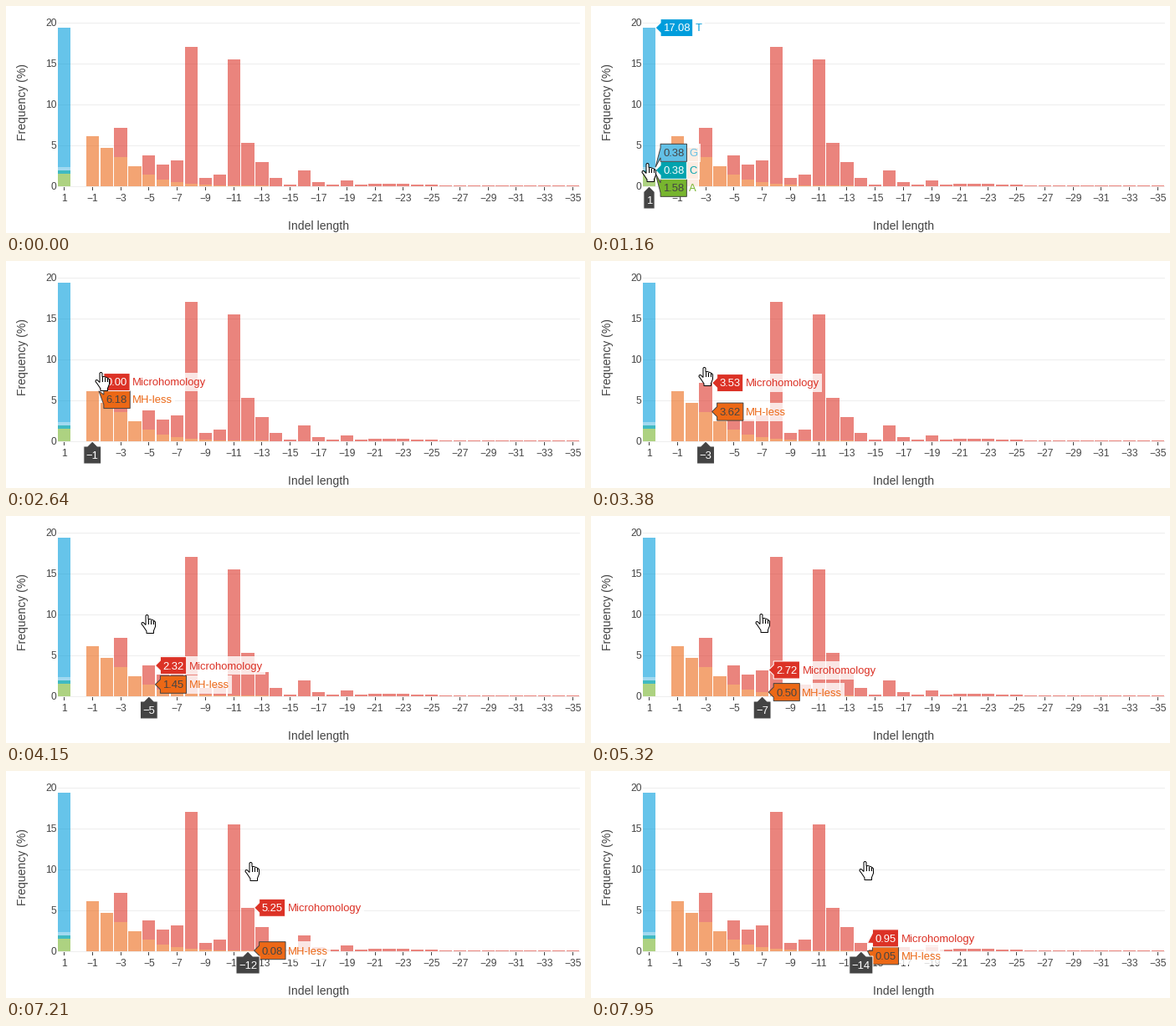
Recreate the animation shown at these times as a matplotlib script. Size 692 px wide and 272 px high, loop 8000 ms.

```python
import numpy as np
import matplotlib.pyplot as plt
from matplotlib.animation import FuncAnimation
from matplotlib.patches import Polygon, Rectangle

W, H, DPI = 692, 272, 64
PX = 72 / DPI                      # points per pixel
STEP, LOOP = 50, 8000
SLOT, BAR, BASE, UNIT = 16.89, 15.2, 216, 9.78
DARK = "#444444"

plt.rcParams["font.family"] = "Liberation Sans"
fig = plt.figure(figsize=(W / DPI, H / DPI), dpi=DPI, facecolor="white")
ax = fig.add_axes([0, 0, 1, 1])
ax.set(xlim=(0, W), ylim=(H, 0))
ax.axis("off")

# Stacked series, bottom first: name, colour, dark ink, value, opacity
INSERTIONS = [
    ("A", "#77b52e", True, 1.58, 0.6),
    ("C", "#00a3ae", False, 0.38, 0.75),
    ("G", "#62c0e6", True, 0.38, 0.6),
    ("T", "#009ddc", False, 17.08, 0.6),
]
MICRO_PEAKS = {3: 3.53, 5: 2.32, 6: 1.82, 7: 2.72, 8: 16.75, 9: 0.85, 10: 1.33,
               11: 15.4, 12: 5.25, 13: 2.9, 14: 0.95, 16: 1.9, 17: 0.45, 19: 0.65}


def mh_less(length):
    """Smooth decay, interpolated on a log scale."""
    keys = [1, 3, 4, 5, 7, 10, 14, 35]
    return np.exp(np.interp(length, keys, np.log([6.18, 3.62, 2.45, 1.45, 0.5,
                                                  0.14, 0.05, 0.02])))


def microhomology(length):
    """Named peaks on a thin tail with a slight bump near 22."""
    tail = max(0.07, 0.26 - 0.0055 * length) + 0.16 * np.exp(-((length - 22) / 1.6) ** 2)
    return MICRO_PEAKS.get(length, tail if length > 14 else 0)


def x_of(n):
    return 86.37 - SLOT * n


def y_of(value):
    return BASE - UNIT * value


def series(n):
    if n > 0:
        return INSERTIONS
    return [("MH-less", "#ec6816", True, mh_less(-n), 0.6),
            ("Microhomology", "#dc3226", False, microhomology(-n), 0.6)]


def signed(n):
    return str(n).replace("-", "\u2212")


def write(x, y, text, size, color=DARK, ha="left", z=3):
    """Text whose digits are vertically centred on y."""
    return ax.text(x, y + 0.34 * size, text, fontsize=size * PX, color=color,
                   ha=ha, va="baseline", zorder=z)


def text_width(artist):
    return artist.get_window_extent().width


def block(x, y, w, h, color, alpha=1, z=2):
    return ax.add_patch(Rectangle((x, y), w, h, fc=color, alpha=alpha, lw=0, zorder=z))


def shape(points, fill, edge, z=6):
    return ax.add_patch(Polygon(points, closed=True, fc=fill, ec=edge, lw=PX,
                                joinstyle="miter", zorder=z))


def draw_chart():
    for value in range(0, 21, 5):
        y = round(y_of(value))
        block(62, y, 624, 1, "#eeeeee", z=1)
        write(60.5, y + 0.3, str(value), 12, ha="right")
    for n in [1, *range(-1, -36, -1)]:
        left, right = round(x_of(n) - BAR / 2), round(x_of(n) + BAR / 2)
        total = 0
        for _, color, _, value, alpha in series(n):
            low, high = round(y_of(total)), round(y_of(total + value))
            total += value
            block(left, high, right - left, low - high, color, alpha)
        if n % 2:
            block(int(x_of(n)), 217, 1, 4, DARK, z=3)
            write(x_of(n), 230, signed(n), 12, ha="center")
    write(373.5, 262.9, "Indel length", 14, ha="center")
    ax.text(20, 115, "Frequency (%)", fontsize=14 * PX, color=DARK,
            rotation=90, ha="center", va="center", zorder=3)


def spread(tops, gap=21):
    """Relax label centres (bottom first) until none overlap."""
    mids = np.array(tops)
    for _ in range(40):
        for i in range(len(mids) - 1):
            push = max(0, gap - (mids[i] - mids[i + 1])) / 2
            mids[i] += push
            mids[i + 1] -= push
    return mids


def hover_group(n):
    """All labels shown while category n is hovered."""
    group = []
    tops = y_of(np.cumsum([s[3] for s in series(n)]))
    tip = x_of(n) + BAR / 2
    left = tip + 6
    for (name, color, dark, value, _), top, mid in zip(series(n), tops, spread(tops)):
        ink = DARK if dark else "white"
        label = write(left + 3, mid, f"{value:.2f}", 13, ink, z=7)
        right = left + text_width(label) + 6
        title = write(right + 3, mid, name, 13, color, z=7)
        back = block(right, mid - 11, text_width(title) + 6, 22, "white", 0.8, 5)
        up, down = mid - 10.5, mid + 10.5
        box = shape([(tip, top), (left, mid - 6), (left, up), (right, up),
                     (right, down), (left, down), (left, mid + 6)], color, ink)
        group += [label, title, back, box]
    x = x_of(n)
    label = write(x, 232.5, signed(n), 13, "white", ha="center", z=7)
    half = text_width(label) / 2 + 3
    box = shape([(x, 216), (x + 6, 222), (x + half, 222), (x + half, 243),
                 (x - half, 243), (x - half, 222), (x - 6, 222)], DARK, "white")
    return group + [label, box]


draw_chart()
CATEGORIES = [1, *range(-1, -15, -1)]
hovers = {n: hover_group(n) for n in CATEGORIES}

HAND = np.array([
    (5, 1), (6, 0), (7, 0), (8, 1), (8, 5), (10, 5), (13, 6), (15, 7),
    (16.5, 8.5), (16.5, 14), (14.5, 19), (14.5, 22), (6, 22), (6, 19.5),
    (2, 13.5), (0, 11), (0.3, 9.3), (2, 9), (5, 12)]) - (6.5, 0)
KNUCKLES = np.array([(8, 5), (8, 10), (np.nan, 0), (11, 6), (11, 10),
                     (np.nan, 0), (14, 7.5), (14, 10.5)]) - (6.5, 0)
ARROW = np.array([(0, 0), (0, 16), (3.6, 12.6), (6.2, 18.5), (8.6, 17.5),
                  (6.1, 11.7), (11, 11.5)])
pointer = shape(HAND, "white", "black", 9)
knuckles, = ax.plot([], [], color="black", lw=PX, zorder=10)

# Pointer moves: start, end, x reached; it rests in between
MOVES = [(500, 1250, 69.5), (1340, 1700, 70.5), (1900, 2700, 114), (2870, 3000, 122.5),
         (3180, 3410, 137), (3740, 4350, 176), (4630, 4860, 187), (5090, 5600, 222),
         (5830, 6420, 260.5), (6700, 7210, 292), (7440, 7540, 303), (7720, 7950, 327)]


def ease(p):
    p = np.clip(p, 0, 1) ** 0.85
    return p * p * (3 - 2 * p)


def pointer_at(t):
    x = 4
    for start, end, goal in MOVES:
        x += (goal - x) * ease((t - start) / (end - start))
    y = np.interp(x, [4, 69.5, 70.5, 114, 169, 222, 260, 327],
                  [200, 188, 171, 132, 118, 116, 110, 108])
    return np.array([x, y])


def update(i):
    t = i * STEP
    spot = pointer_at(t)
    hot_x = spot[0] - 2.1
    shown, in_plot = t >= 500, bool(hot_x >= 62)
    current = min(CATEGORIES, key=lambda n: abs(x_of(n) - hot_x))
    for n, group in hovers.items():
        for artist in group:
            artist.set_visible(shown and in_plot and n == current)
    spot = np.round(spot)
    pointer.set_visible(shown)
    pointer.set_xy((HAND if in_plot else ARROW) + spot + 0.5)
    knuckles.set_visible(shown and in_plot)
    knuckles.set_data(*(KNUCKLES + spot + 0.5).T)
    return [pointer, knuckles]


anim = FuncAnimation(fig, update, frames=LOOP // STEP, interval=STEP,
                     repeat=True, repeat_delay=0, blit=False)
plt.show()
```
